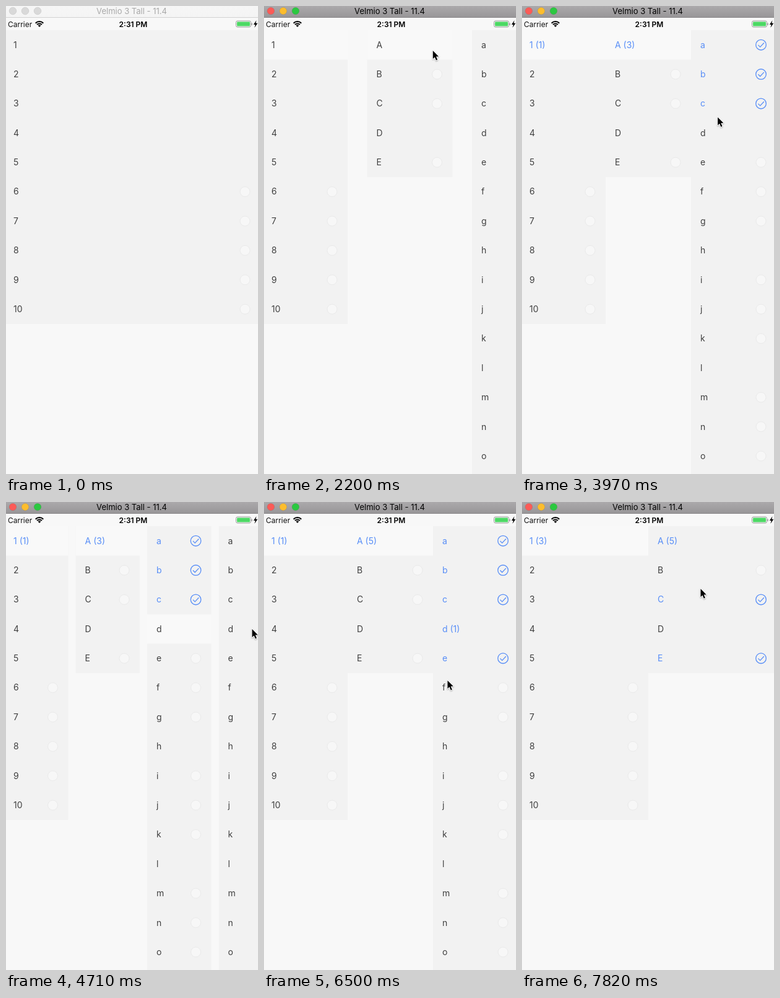
Write an HTML page with a canvas that moves like this. It is 407x755 px and loops after 8 s.

```html
<!DOCTYPE html>
<html lang="en">
<head>
<meta charset="utf-8">
<title>Cascading list picker</title>
<style>
html, body { margin: 0; width: 100%; height: 100%; overflow: hidden; background: #f8f8f8; }
canvas { display: block; width: 407px; height: 755px; }
</style>
</head>
<body>
<canvas id="stage"></canvas>
<script>
const W = 407, H = 755, LOOP = 8000, STEP = 147.6, START = 280;
const TOP = 39, ROW = 47.38, SPAN = 414, LEFT = -3, SLIDE = 285;
const BLUE = '#588ef7', INK = '#404040', PAGE = '#f8f8f8', CELL = '#f2f2f2', OPEN = '#f9f9f9';
const FONT = 'Inter, "Liberation Sans", sans-serif';

const canvas = document.getElementById('stage');
const g = canvas.getContext('2d');
const dpr = window.devicePixelRatio || 1;
canvas.width = W * dpr;
canvas.height = H * dpr;

const letters = (first, n) =>
  Array.from({ length: n }, (_, i) => String.fromCharCode(first.charCodeAt(0) + i));

// opens: whether a row leads to a further column instead of carrying a circle
const columns = [
  { labels: Array.from({ length: 10 }, (_, i) => `${i + 1}`), opens: r => r < 5 },
  { labels: letters('A', 5), opens: r => r % 3 === 0 },
  { labels: letters('a', 16), opens: r => r % 4 === 3 },
  { labels: letters('a', 16), opens: () => false }
];

// Pointer stops: time, x, y and whether it taps there. Taps drive the lists.
const TAP = true;
const stops = [
  [280, 240, 275], [1249, 150, 75, TAP], [1313, 171, 100], [2050, 262, 72, TAP],
  [2600, 300, 72, TAP], [2937, 308, 77], [3050, 310, 105, TAP], [3500, 312, 160, TAP],
  [4542, 320, 203, TAP], [4708, 397, 205], [5080, 383, 194, TAP], [5741, 364, 217],
  [6190, 262, 250, TAP], [6479, 296, 288], [6950, 200, 165, TAP], [7500, 262, 238, TAP],
  [7807, 288, 140]
];

const lerp = (a, b, p) => a + (b - a) * p;
const ease = p => p < 0.5 ? 2 * p * p : 1 - 2 * (1 - p) ** 2;
const edge = (i, n) => LEFT + SPAN * i / n;

function stateAt(t) {
  const s = { from: 1, count: 1, since: -SLIDE, linked: [], checked: new Set() };
  for (const [at, x, y, tap] of stops) {
    if (!tap || at > t) continue;
    const c = Math.floor((x - LEFT) * s.count / SPAN);
    const r = Math.floor((y - TOP) / ROW);
    const opens = columns[c].opens(r);
    if (opens) s.linked[c] = r;
    else s.checked.add(`${c}:${r}`);
    const count = c + (opens ? 2 : 1);
    if (count !== s.count) Object.assign(s, { from: s.count, count, since: at });
  }
  return s;
}

// Chosen rows beneath an opened row; a branch with any choice counts as one.
function chosenUnder(s, c, r) {
  if (s.linked[c] !== r) return 0;
  return columns[c + 1].labels.filter((_, i) =>
    s.checked.has(`${c + 1}:${i}`) || chosenUnder(s, c + 1, i)).length;
}

function box(x, y, w, h, fill) {
  g.fillStyle = fill;
  g.fillRect(x, y, w, h);
}

function pill(x, y, w, h, r) {
  g.beginPath();
  g.roundRect(x, y, w, h, r);
}

function disc(x, y, r, fill, stroke, width = 1) {
  g.beginPath();
  g.arc(x, y, r, 0, Math.PI * 2);
  if (fill) { g.fillStyle = fill; g.fill(); }
  g.strokeStyle = stroke;
  g.lineWidth = width;
  g.stroke();
}

function line(points, close) {
  g.beginPath();
  points.forEach(([x, y]) => g.lineTo(x, y));
  if (close) g.closePath();
}

function text(s, x, y, size, color, align = 'left', weight = 400) {
  g.font = `${weight} ${size}px ${FONT}`;
  g.textAlign = align;
  g.fillStyle = color;
  g.fillText(s, x, y);
}

function titleBar(active) {
  const shade = g.createLinearGradient(0, 0, 0, 19);
  shade.addColorStop(0, active ? '#aba9ab' : '#f6f6f6');
  shade.addColorStop(1, active ? '#979597' : '#f4f4f4');
  box(0, 0, W, 19, shade);
  box(0, 18, W, 1, active ? '#8b898b' : '#d3d3d3');
  ['#fc5b57', '#fdbd2d', '#2bc840'].forEach((c, i) =>
    disc(11 + 20 * i, 8, 5.8, active ? c : '#d9d9d9', active ? 'rgba(0,0,0,.12)' : '#c9c9c9', 0.7));
  text('Velmio 3 Tall - 11.4', 203, 13, 13, active ? '#000' : '#a8a8a8', 'center');
}

function statusBar() {
  text('Carrier', 3, 33.7, 12, '#111');
  text('2:31 PM', 205.5, 33.7, 12, '#000', 'center', 600);

  g.strokeStyle = '#000';
  for (const [r, width] of [[1.7, 3.4], [5.6, 2], [8.9, 2]]) {
    g.lineWidth = width;
    g.beginPath();
    g.arc(54, 34, r, -Math.PI * 0.75, -Math.PI * 0.25);
    g.stroke();
  }

  g.strokeStyle = '#999';
  g.lineWidth = 1;
  pill(371.5, 24, 24, 10, 2.5);
  g.stroke();
  g.fillStyle = '#4cd964';
  pill(373, 25.5, 21, 7, 1);
  g.fill();
  box(396.5, 27.5, 1.3, 3.5, '#999');
  line([[404.5, 23], [399.8, 30], [402.6, 30], [401.4, 35], [406.3, 27.8], [403.3, 27.8]], true);
  g.fillStyle = '#000';
  g.fill();
}

function mark(x, y, on) {
  if (!on) return disc(x, y, 8, '#f7f7f7', '#eaeaea');
  disc(x, y, 8.3, null, BLUE, 1.3);
  line([[x - 4.6, y + 0.2], [x - 1.4, y + 3.4], [x + 4.8, y - 3.2]]);
  g.stroke();
}

function drawColumn(s, c, x, w) {
  const { labels, opens } = columns[c];
  box(x, TOP, w, labels.length * ROW, CELL);
  labels.forEach((label, r) => {
    const y = TOP + r * ROW, mid = y + ROW / 2;
    const on = s.checked.has(`${c}:${r}`), n = chosenUnder(s, c, r);
    if (s.linked[c] === r && c < s.count - 1) box(x, y, w, ROW, OPEN);
    text(n ? `${label} (${n})` : label, x + 15, mid + 4.9, 14, n || on ? BLUE : INK);
    if (!opens(r)) mark(x + w - 25, mid, on);
  });
}

function drawColumns(t) {
  const s = stateAt(t);
  const raw = Math.min(1, (t - s.since) / SLIDE), p = ease(raw);
  const shown = raw < 1 ? Math.max(s.from, s.count) : s.count;
  for (let c = 0; c < shown; c++) {
    drawColumn(s, c, lerp(edge(c, s.from), edge(c, s.count), p), SPAN / s.count);
  }
}

function drawCursor(t) {
  const i = stops.findLastIndex(k => t >= k[0]);
  if (i < 0) return;
  const a = stops[i], b = stops[i + 1] || [LOOP, a[1], a[2]];
  const p = (t - a[0]) / (b[0] - a[0]);
  g.save();
  g.translate(lerp(a[1], b[1], p), lerp(a[2], b[2], p));
  line([[0.5, 0], [0.5, 13.2], [3.5, 10.4], [5.7, 15.6], [7.9, 14.7], [5.7, 9.6], [9.8, 9.4]], true);
  g.shadowColor = 'rgba(0,0,0,.3)';
  g.shadowBlur = 2;
  g.shadowOffsetY = 1;
  g.strokeStyle = '#fff';
  g.lineWidth = 2;
  g.lineJoin = 'round';
  g.stroke();
  g.shadowColor = 'transparent';
  g.fillStyle = '#000';
  g.fill();
  g.restore();
}

function draw(ms) {
  // The screen refreshes in coarse steps.
  const t = ms < START ? 0 : START + Math.floor((ms - START) / STEP) * STEP;
  g.setTransform(dpr, 0, 0, dpr, 0, 0);
  box(0, 0, W, H, PAGE);
  drawColumns(t);
  titleBar(t > 500);
  statusBar();
  drawCursor(t);
}

const begin = performance.now();
function tick() {
  draw((performance.now() - begin) % LOOP);
  requestAnimationFrame(tick);
}
tick();
</script>
</body>
</html>
```
